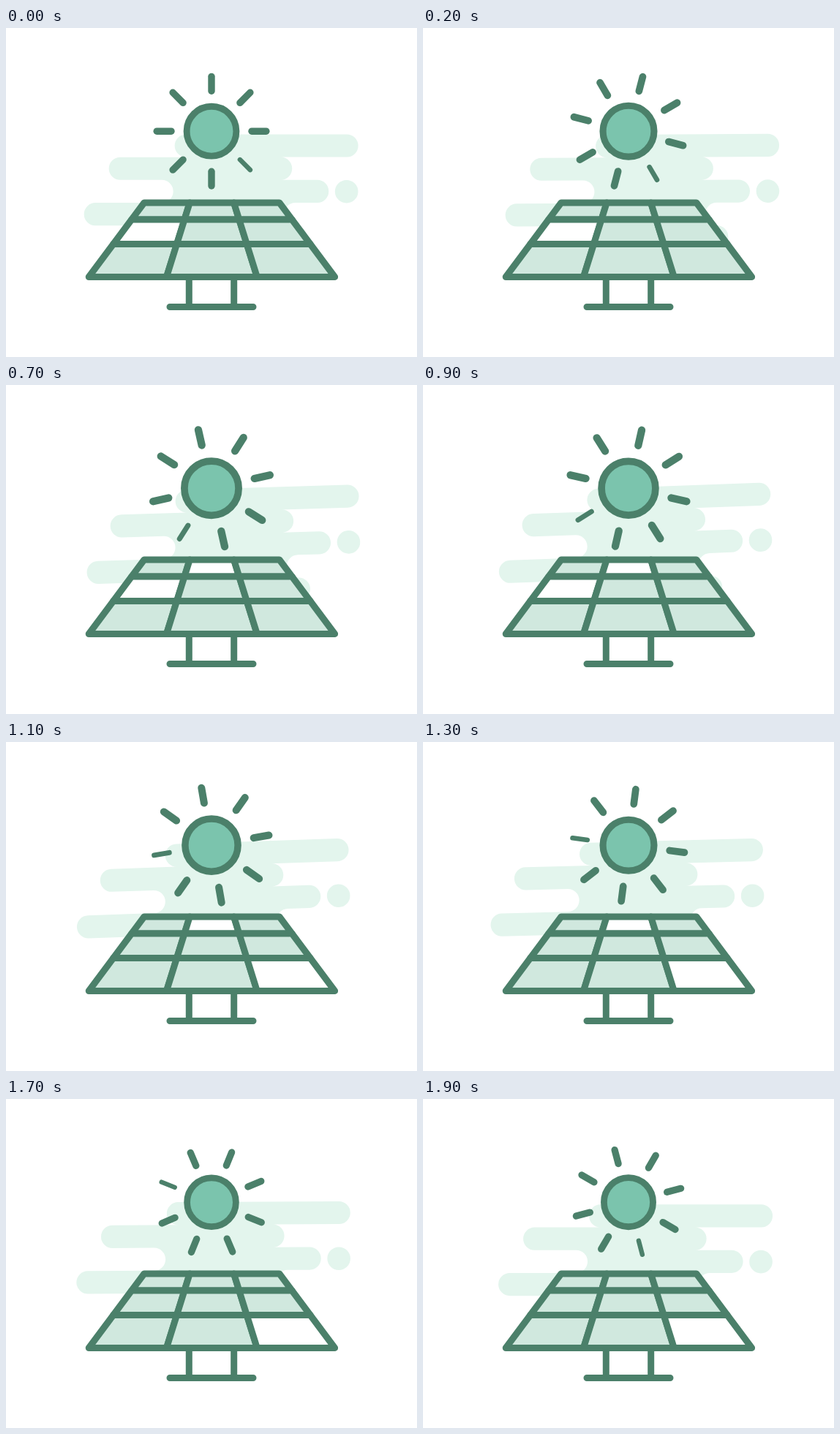
An HTML page for the animation above (2000 ms loop, 562 by 450 pixels).

```html
<!DOCTYPE html>
<html lang="en">
<head>
<meta charset="utf-8">
<title>Solar panel</title>
<style>
  html, body { margin: 0; width: 100%; height: 100%; overflow: hidden; background: #fff; }
  svg { display: block; width: 562px; height: 450px; }
  .line { fill: none; stroke: #4b806a; stroke-width: 9; stroke-linecap: round; stroke-linejoin: round; }
</style>
</head>
<body>
<svg viewBox="0 0 562 450">
  <g id="cloud" fill="#e3f5ed">
    <path d="M246.6 146.7H466.4a15.6 15.6 0 0 1 0 31.2H376a15.6 15.6 0 0 1 0 31.2H426a15.6 15.6 0 0 1 0 31.2H396a15.6 15.6 0 0 0 0 31.2a15.6 15.6 0 0 1 0 31.2H200V271.5H122.6a15.6 15.6 0 0 1 0-31.2H213.4a15.6 15.6 0 0 0 0-31.2H156.6a15.6 15.6 0 0 1 0-31.2H246.6a15.6 15.6 0 0 1 0-31.2z"/>
    <circle cx="466" cy="225" r="15.8"/>
  </g>
  <g id="sun" class="line">
    <circle r="34.2" fill="#7bc4ad"/>
    <g id="rays"></g>
  </g>
  <g id="cells" class="line"></g>
  <path class="line" d="M224 381.5H338M250.3 341V381M311.7 341V381"/>
</svg>
<script>
const LOOP = 2000, STEP = 100;
const $ = id => document.getElementById(id);

function add(parent, tag, attrs) {
  const node = document.createElementNS(parent.namespaceURI, tag);
  for (const name in attrs) node.setAttribute(name, attrs[name]);
  return parent.appendChild(node);
}

for (let i = 0; i < 8; i++)
  add($('rays'), 'path', {
    d: 'M55.5 0H75.5',
    transform: `rotate(${i * 45})`,
    'stroke-width': i === 1 ? 6.5 : 9.5
  });

// Panel in perspective: column edges mirror around the centre and widen downwards.
const CENTER = 281.4, rows = [239, 262, 295.5, 340.5];
const corner = (row, col) => {
  const depth = (rows[row] - rows[0]) / (rows[3] - rows[0]);
  const side = Math.sign(col - 1.5);
  const half = col % 3 ? 30.2 + 31.7 * depth : 92.5 + 75.7 * depth;
  return `${CENTER + side * half},${rows[row]}`;
};
const cells = Array.from({ length: 9 }, (_, i) => {
  const r = Math.floor(i / 3), c = i % 3;
  return add($('cells'), 'polygon', {
    points: [corner(r, c), corner(r, c + 1), corner(r + 1, c + 1), corner(r + 1, c)].join(' ')
  });
});
// Cells that turn white for half a loop, each starting a quarter loop later.
const flashing = [3, 1, 8];

const wave = (t, mean, amplitude, peak) =>
  mean + amplitude * Math.cos((t - peak) / LOOP * 2 * Math.PI);

// The rays turn slowly one way, then spring back.
function sunTurn(t) {
  const peak = 1700;
  const swing = t < peak
    ? Math.sin(t / peak * Math.PI / 2) ** 1.4
    : ((LOOP - t) / (LOOP - peak)) ** 1.5;
  return 157 * swing;
}

function draw(t) {
  const x = wave(t, -4.7, 11.8, 380);
  const y = -7 * wave(t, 0.5, -0.5, 450) ** 2;
  const tilt = wave(t, -1.03, -1.03, 950);
  $('cloud').setAttribute('transform', `translate(${x} ${y}) rotate(${tilt} 141 193)`);
  $('sun').setAttribute('transform',
    `translate(281 141.2) scale(${wave(t, 1.03, 0.055, 750)})`);
  $('rays').setAttribute('transform', `rotate(${sunTurn(t)})`);
  cells.forEach((cell, i) => {
    const order = flashing.indexOf(i), age = t - order * LOOP / 4;
    const white = order >= 0 && age >= 0 && age < LOOP / 2;
    cell.setAttribute('fill', white ? '#fff' : '#d0e8de');
  });
}

function frame() {
  draw(Math.floor(performance.now() % LOOP / STEP) * STEP);
  requestAnimationFrame(frame);
}
frame();
</script>
</body>
</html>
```
